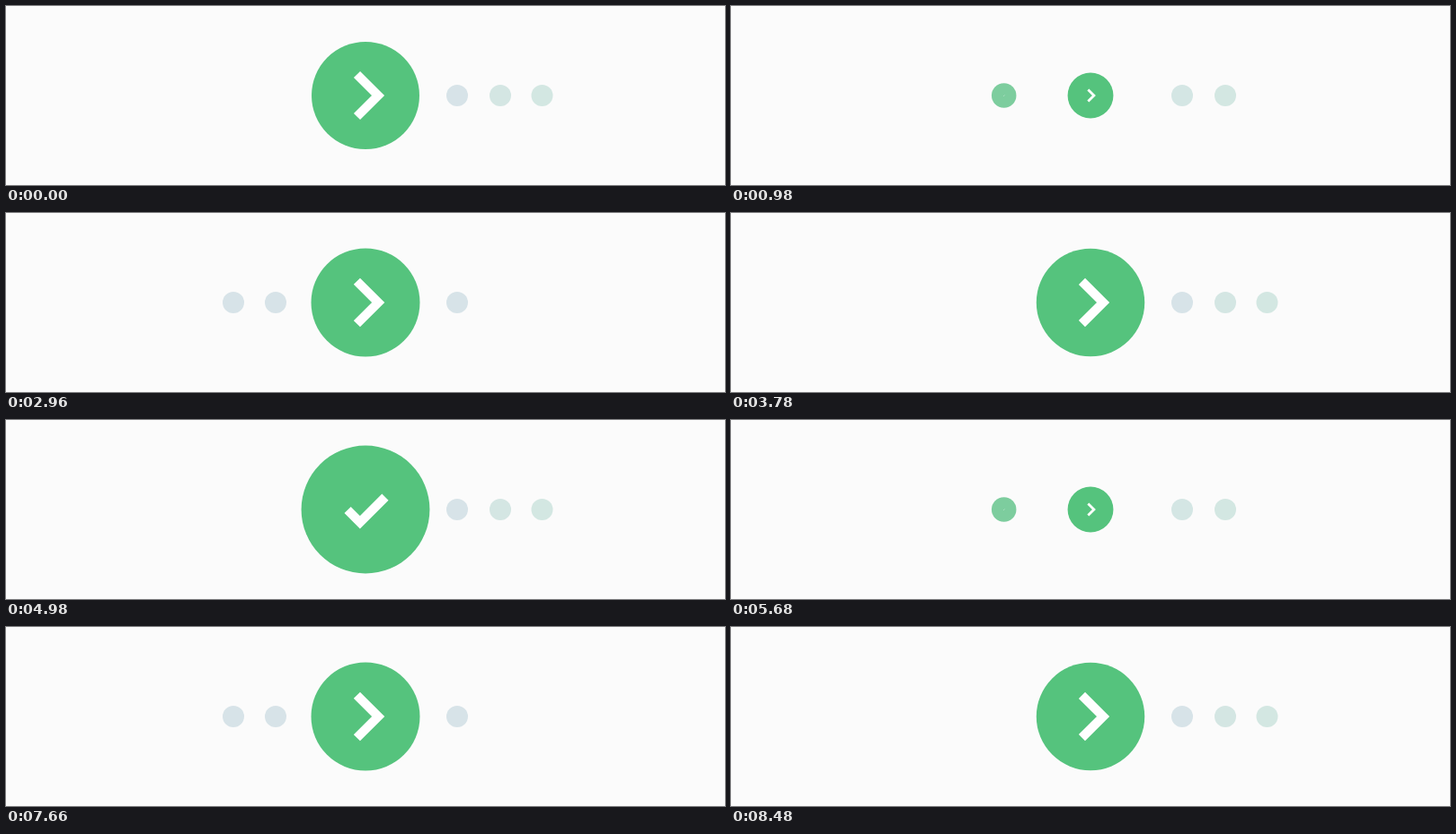
These frames come from a looping animation (800 px wide and 200 px high, 9400 ms). An HTML page with a canvas:

```html
<!DOCTYPE html>
<html lang="en">
<head>
<meta charset="utf-8">
<title>Step carousel</title>
<style>
  html, body { margin: 0; width: 100%; height: 100%; overflow: hidden; background: #fbfbfb; }
  canvas { display: block; width: 800px; height: 200px; }
</style>
</head>
<body>
<canvas id="stage" width="800" height="200"></canvas>
<script>
const ctx = document.getElementById('stage').getContext('2d');

const PERIOD = 4700;
const DOT = 12, BIG = 60;
const GREEN = [85, 195, 125];
const GREY = [215, 227, 232];

// x of each slot, from two places left of the centre to three places right
const SLOT_X = [253, 300, 400, 502, 550, 596.5];

// tints of the waiting dots, by active step and distance to the right
const TINTS = [
  [GREY, [212, 230, 227], [211, 231, 226]],
  [GREY, [214, 228, 230]],
  [GREY]
];

const SLIDES = [
  { at: 760, from: 0, to: 1, move: 200, grow: 290, back: 1.25 },
  { at: 2500, from: 1, to: 2, move: 200, grow: 290, back: 1.25 },
  { at: 3420, from: 2, to: 0, move: 160, grow: 220, back: 0.8 }
];

// when each step gets tapped
const TAPS = [0, 1580];

// radius after a tap
const PULSE = [[0, 60], [240, 72], [560, 59], [840, 60]];

const CHEVRON = [[-9.5, -23.5], [14, 0], [-9.5, 23.5]];
const CHECK = [[-19.5, 0.5], [-6, 14], [21.5, -13.5]];

const clamp = v => Math.min(1, Math.max(0, v));
const span = (t, start, length) => clamp((t - start) / length);
const mix = (a, b, k) => a + (b - a) * k;
const mixColor = (a, b, k) => a.map((v, i) => mix(v, b[i], k));
const smooth = k => k * k * (3 - 2 * k);
const easeIn = k => k ** 4;
const easeInOut = k => k < 0.5 ? 2 * k * k : 1 - 2 * (1 - k) ** 2;
const backOut = (k, s) => 1 - (1 - k) ** 2 * ((s + 1) * (1 - k) - s);

function track(keys, t) {
  for (let i = 1; i < keys.length; i++) {
    const [t0, v0] = keys[i - 1], [t1, v1] = keys[i];
    if (t < t1) return mix(v0, v1, smooth(span(t, t0, t1 - t0)));
  }
  return keys[keys.length - 1][1];
}

const slotX = offset => SLOT_X[offset + 2];

function restColor(active, offset) {
  if (offset === 0) return GREEN;
  return offset < 0 ? GREY : TINTS[active][offset - 1];
}

// place, size (0 dot, 1 full circle) and colour of one step
function pose(step, t) {
  const slide = SLIDES.filter(s => s.at <= t).pop();
  if (!slide) return { x: slotX(step), size: step ? 0 : 1, color: restColor(0, step) };

  const a = step - slide.from, b = step - slide.to;
  const land = slide.at + slide.move;
  const start = restColor(slide.from, a), end = restColor(slide.to, b);

  if (a === 0) {
    const k = easeInOut(span(t, land - 100, 140));
    return {
      x: mix(slotX(a), slotX(b), k),
      size: 1 - k,
      color: mixColor(start, end, span(t, land - 40, 200))
    };
  }
  const k = span(t, slide.at, slide.move);
  const x = mix(slotX(a), slotX(b), easeIn(k));
  if (b === 0) {
    const size = backOut(span(t, land, slide.grow), slide.back);
    return { x, size, color: mixColor(start, end, k) };
  }
  return { x, size: 0, color: mixColor(start, end, span(t, land, 200)) };
}

function icon(points, x, scale) {
  if (scale < 0.01) return;
  ctx.save();
  ctx.translate(x, 100);
  ctx.scale(scale, scale);
  ctx.beginPath();
  points.forEach(p => ctx.lineTo(...p));
  ctx.lineWidth = 10;
  ctx.strokeStyle = '#fff';
  ctx.stroke();
  ctx.restore();
}

function drawStep(step, { x, size, color }, t) {
  const tapped = t - TAPS[step];
  const active = tapped >= 0 && t < SLIDES[2].at;
  const pulse = active ? track(PULSE, tapped) / BIG : 1;
  ctx.beginPath();
  ctx.arc(x, 100, mix(DOT, BIG * pulse, size), 0, Math.PI * 2);
  ctx.fillStyle = `rgb(${color.map(Math.round)})`;
  ctx.fill();

  const scale = size * pulse;
  if (!active) return icon(CHEVRON, x, scale);
  icon(CHEVRON, x, scale * (1 - smooth(span(tapped, 20, 180))));
  icon(CHECK, x, scale * backOut(span(tapped, 200, 240), 1));
}

function draw(now) {
  const t = now % PERIOD;
  ctx.fillStyle = '#fbfbfb';
  ctx.fillRect(0, 0, 800, 200);
  [0, 1, 2, 3]
    .map(step => [step, pose(step, t)])
    .sort((a, b) => a[1].size - b[1].size)
    .forEach(([step, p]) => drawStep(step, p, t));
}

const begin = performance.now();
function tick() {
  draw(performance.now() - begin);
  requestAnimationFrame(tick);
}
tick();
</script>
</body>
</html>
```
